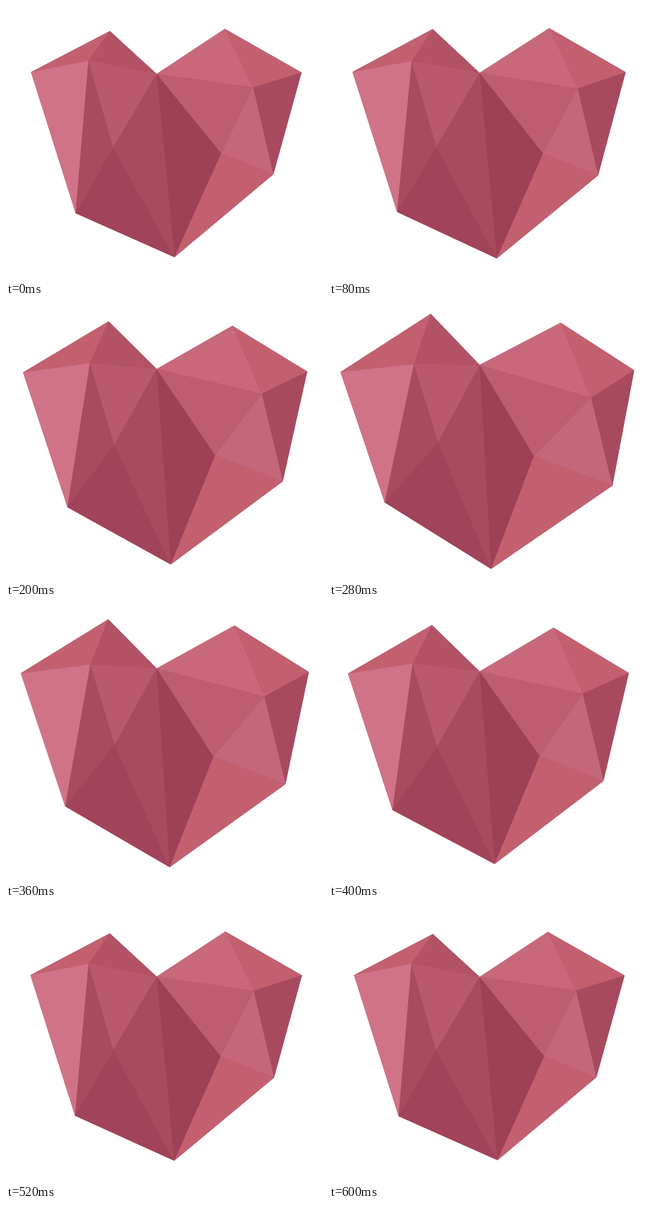
An HTML page with a canvas that plays this animation: 444 by 382 pixels, repeating every 840 ms.

```html
<!DOCTYPE html>
<html lang="en">
<head>
<meta charset="utf-8">
<title>Beating heart</title>
<style>
  html, body { margin: 0; width: 100%; height: 100%; overflow: hidden; background: #fff; }
  canvas { display: block; }
</style>
</head>
<body>
<canvas id="stage" width="444" height="382"></canvas>
<script>
const ctx = document.getElementById('stage').getContext('2d');
const LOOP = 840, STEP = 40, PEAK = 280, REST = 600;

// Each corner: x, y at rest, then x, y at full beat.
const corners = {
  A: [35, 92.5, 16, 91],
  B: [145.5, 35, 142.5, 9.5],
  C: [115.5, 76.5, 119, 80],
  D: [211, 95, 211, 81],
  E: [150, 198, 153, 189],
  F: [97.5, 290, 78, 273.5],
  G: [236, 351.5, 227, 366.5],
  H: [301.5, 206, 287, 208.5],
  I: [306.5, 32, 324.5, 22],
  J: [346, 114, 367, 127],
  K: [414, 93, 427.5, 88.5],
  L: [374.5, 235.5, 397, 250]
};

const outline = 'ABDIKLGF';
const facets = [
  ['ABC', '#c26070'], ['BCD', '#b15365'], ['ACF', '#d07389'],
  ['CEF', '#a94b5f'], ['CDE', '#b8596d'], ['FEG', '#a1435a'],
  ['EDG', '#a94b5f'], ['DHG', '#9e4056'], ['DIJ', '#c8697b'],
  ['IKJ', '#c26070'], ['DJH', '#bc5e70'], ['JKL', '#a84a5e'],
  ['JLH', '#c4677a'], ['HLG', '#c26070']
];

// Cubic easing from (0,0) to (1,1) with handles (x1,0) and (x2,1).
function ease(x, x1, x2) {
  let lo = 0, hi = 1;
  for (let i = 0; i < 24; i++) {
    const u = (lo + hi) / 2, v = 1 - u;
    if (3 * v * v * u * x1 + 3 * v * u * u * x2 + u * u * u < x) lo = u;
    else hi = u;
  }
  return lo * lo * (3 - 2 * lo);
}

function beat(t) {
  if (t <= 0 || t >= REST) return 0;
  if (t === PEAK) return 1;
  return t < PEAK
    ? ease(t / PEAK, 0.47, 0.94)
    : 1 - ease((t - PEAK) / (REST - PEAK), 0.38, 0.22);
}

function fillShape(names, color, p) {
  ctx.beginPath();
  for (const name of names) {
    const [x0, y0, x1, y1] = corners[name];
    ctx.lineTo(x0 + (x1 - x0) * p, y0 + (y1 - y0) * p);
  }
  ctx.closePath();
  ctx.fillStyle = color;
  ctx.fill();
}

function draw(now) {
  const t = Math.floor((now % LOOP) / STEP) * STEP;
  const p = beat(t);
  ctx.fillStyle = '#fff';
  ctx.fillRect(0, 0, 444, 382);
  // A solid base hides the seams between facets.
  fillShape(outline, '#b15365', p);
  for (const [names, color] of facets) fillShape(names, color, p);
}

const start = performance.now();
function tick() {
  draw(performance.now() - start);
  requestAnimationFrame(tick);
}
tick();
</script>
</body>
</html>
```
